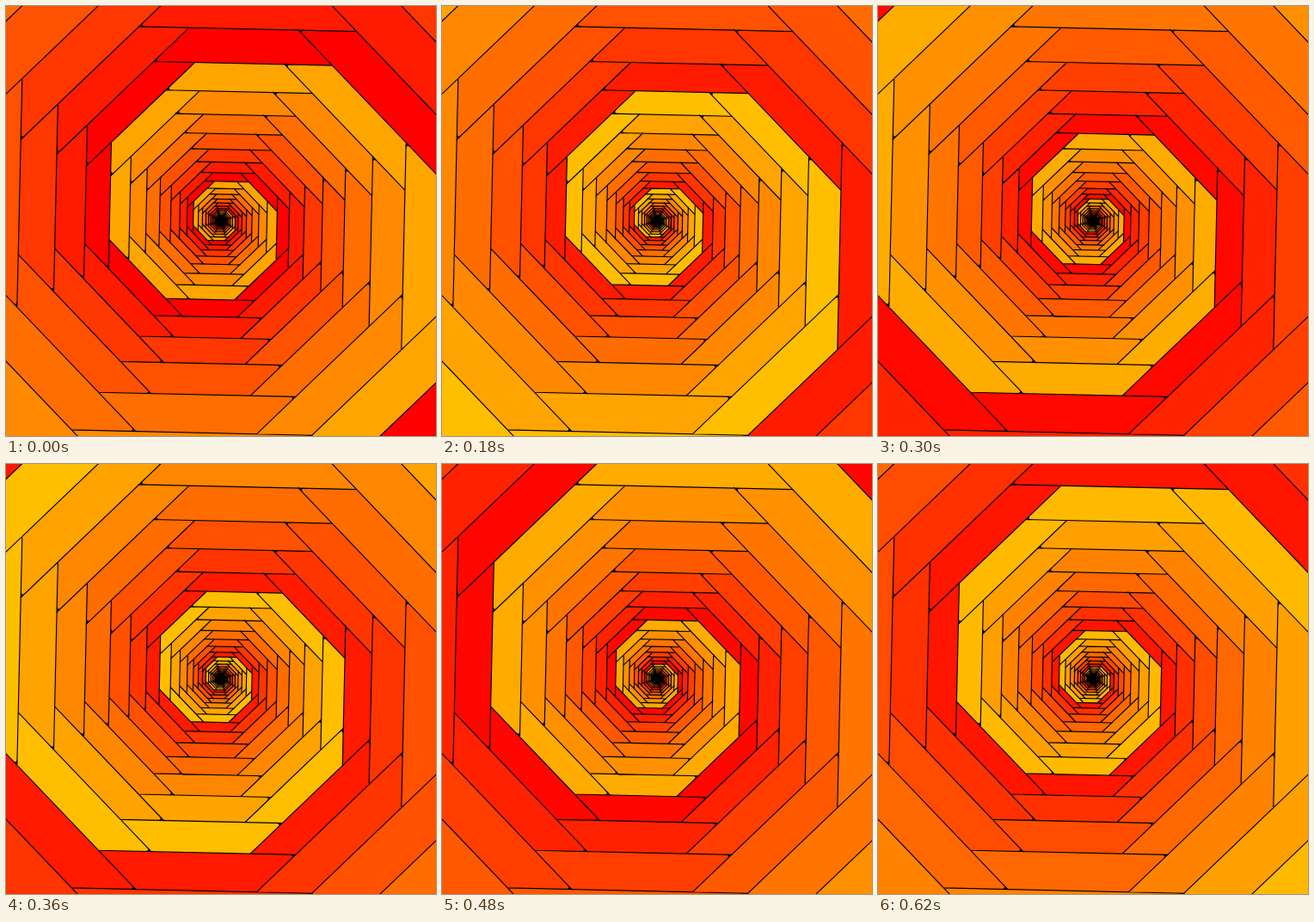
An HTML page with a canvas for the animation above (0.64 s loop, 500x500 px).

```html
<!DOCTYPE html>
<html lang="en">
<head>
<meta charset="utf-8">
<title>Octagonal spiral</title>
<style>
html, body { margin: 0; width: 100%; height: 100%; overflow: hidden; background: #000; }
canvas { display: block; width: 500px; height: 500px; }
</style>
</head>
<body>
<canvas id="stage" width="500" height="500"></canvas>
<script>
const ctx = document.getElementById("stage").getContext("2d");

const LOOP = 640, STEP = 20;
const CENTER_X = 250.2, CENTER_Y = 249.8, BASE = 183.5;
const TILT = 1.28 * Math.PI / 180;
const ARMS = 7, SIDES = 8;
const ARM_SCALE = 0.25 ** (1 / ARMS);
const SIDE_SCALE = 0.25 ** (1 / SIDES);
const MAX_GREEN = 192;

// One trapezoid of an arm; d is the distance of its outer edge from the center.
function makeTile(arm, side) {
  const d = BASE * ARM_SCALE ** arm * SIDE_SCALE ** side;
  const inner = d * ARM_SCALE;
  const next = d * SIDE_SCALE * Math.SQRT2;
  const prev = inner / SIDE_SCALE * Math.SQRT2;
  const angle = TILT - Math.PI / 2 - side * Math.PI / 4;
  const nx = Math.cos(angle), ny = Math.sin(angle);
  const point = (dist, along) => [
    CENTER_X + nx * dist + ny * along,
    CENTER_Y + ny * dist - nx * along
  ];
  return {
    d,
    corners: [
      point(d, next - d),
      point(d, d - prev),
      point(inner, inner - prev),
      point(inner, next - inner)
    ]
  };
}

function toward([x, y], [tx, ty], length) {
  const k = length / Math.hypot(tx - x, ty - y);
  return [x + (tx - x) * k, y + (ty - y) * k];
}

function addPolygon(path, points) {
  points.forEach(([x, y], i) => i ? path.lineTo(x, y) : path.moveTo(x, y));
  path.closePath();
}

// Rounds off the sharp corner at tip between its neighbours a and c.
function addFillet(path, tip, a, c, size) {
  path.moveTo(...tip);
  path.lineTo(...toward(tip, a, size));
  path.quadraticCurveTo(...tip, ...toward(tip, c, size));
  path.closePath();
}

const armPaths = Array.from({ length: ARMS }, () => new Path2D());
const lines = new Path2D();
const fillets = new Path2D();

for (let arm = -14; arm < 28; arm++) {
  for (let side = 0; side < SIDES; side++) {
    const { d, corners } = makeTile(arm, side);
    const [a, , c, tip] = corners;
    addPolygon(armPaths[(arm + 14) % ARMS], corners);
    lines.moveTo(...toward(c, tip, -0.5));
    lines.lineTo(...toward(tip, c, -1));
    addFillet(fillets, tip, a, c, Math.min(9, d * 0.06));
  }
}

function draw(time) {
  const phase = Math.floor(time % LOOP / STEP) * STEP / LOOP * ARMS;
  armPaths.forEach((path, i) => {
    const level = (ARMS - 1 - i + phase) % ARMS / ARMS;
    ctx.fillStyle = `rgb(255, ${Math.round(level * MAX_GREEN)}, 0)`;
    ctx.fill(path);
  });
  ctx.fillStyle = ctx.strokeStyle = "#000";
  ctx.lineWidth = 1.15;
  ctx.stroke(lines);
  ctx.fill(fillets);
  ctx.beginPath();
  ctx.arc(CENTER_X, CENTER_Y, 6, 0, Math.PI * 2);
  ctx.fill();
}

function frame() {
  draw(performance.now());
  requestAnimationFrame(frame);
}
frame();
</script>
</body>
</html>
```
